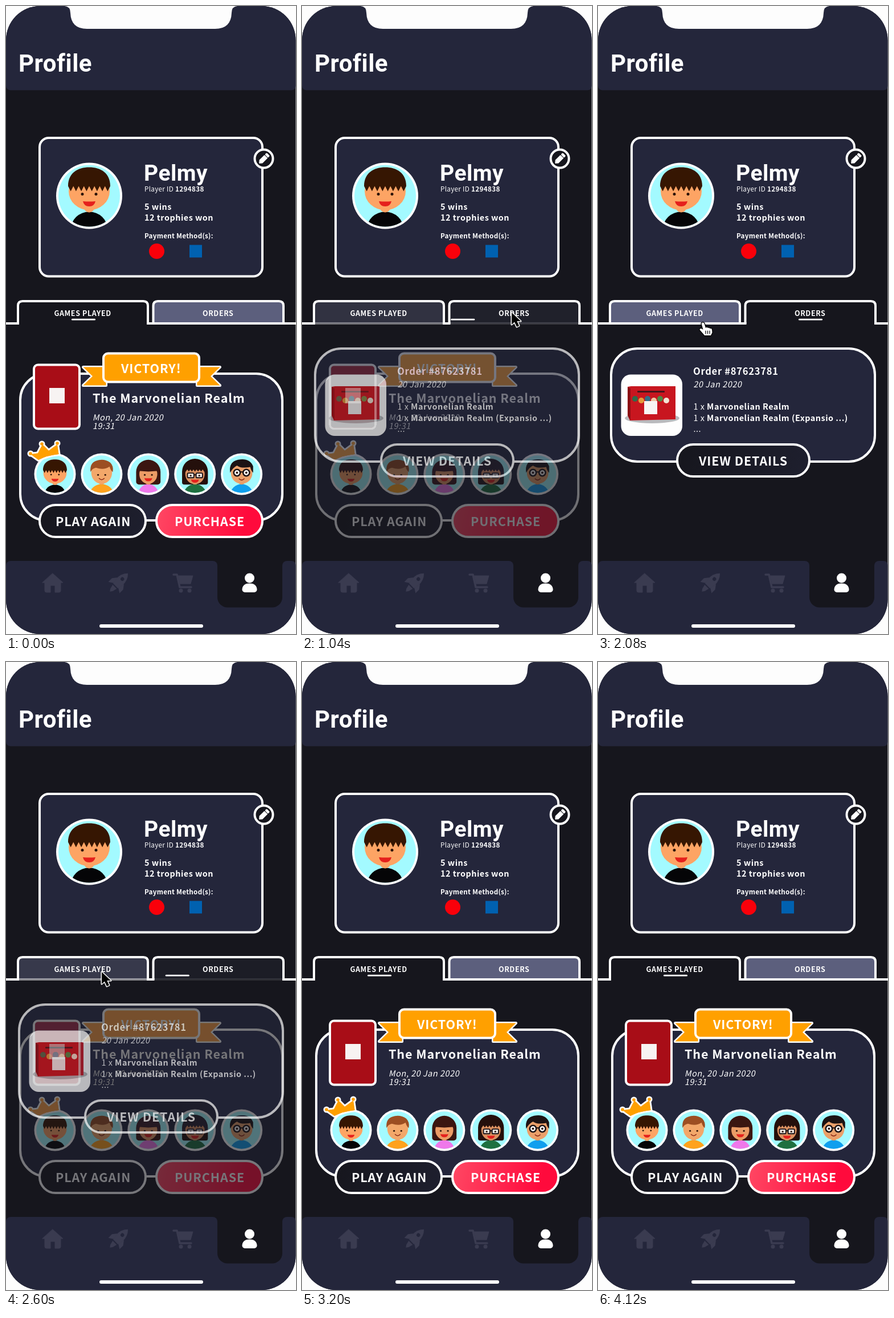
An HTML page with a canvas that plays this animation: 509x1100 px, repeating every 4160 ms.

```html
<!DOCTYPE html>
<html lang="en">
<head>
<meta charset="utf-8">
<title>Profile</title>
<style>
html, body { margin: 0; width: 100%; height: 100%; overflow: hidden; background: #fdfdfd; }
canvas { display: block; width: 509px; height: 1100px; }
</style>
</head>
<body>
<canvas id="stage"></canvas>
<script>
const W = 509, H = 1100, LOOP = 4160;
const NAVY = '#24263b', DARK = '#16161d', LILAC = '#5c5f7d', ICON = '#3a3b50';
const WHITE = '#fff', ORANGE = '#ffa000', SKY = '#a3faff';
const FONT = '"Noto Sans CJK SC", "Noto Sans CJK JP", "Noto Sans CJK", "Noto Sans", sans-serif';
const HEADING = 'Roboto, "Open Sans", sans-serif';
const ratio = window.devicePixelRatio || 1;

function layer(canvas) {
  canvas.width = W * ratio;
  canvas.height = H * ratio;
  const ctx = canvas.getContext('2d');
  ctx.scale(ratio, ratio);
  ctx.lineJoin = ctx.lineCap = 'round';
  return ctx;
}

const stage = layer(document.getElementById('stage'));
let c = stage;

// ---- helpers ----
function paint(fill, stroke, width = 4) {
  if (fill) { c.fillStyle = fill; c.fill(); }
  if (stroke) { c.strokeStyle = stroke; c.lineWidth = width; c.stroke(); }
}

function box(x, y, w, h, r, fill, stroke, width) {
  c.beginPath();
  c.roundRect(x, y, w, h, r);
  paint(fill, stroke, width);
}

function oval(x, y, rx, ry, fill, stroke, width) {
  c.beginPath();
  c.ellipse(x, y, rx, ry, 0, 0, 7);
  paint(fill, stroke, width);
}

const disc = (x, y, r, fill, stroke, width) => oval(x, y, r, r, fill, stroke, width);

function shape(d, fill, stroke, width) {
  const path = new Path2D(d);
  if (stroke) { c.strokeStyle = stroke; c.lineWidth = width; c.stroke(path); }
  if (fill) { c.fillStyle = fill; c.fill(path); }
}

function text(str, x, y, size, weight = 700, gap = 0, slant = 0, family = FONT) {
  c.save();
  c.translate(x, y);
  c.transform(1, 0, -slant, 1, 0, 0);
  c.font = `${weight} ${size}px ${family}`;
  c.letterSpacing = gap + 'px';
  c.fillStyle = WHITE;
  c.fillText(str, 0, 0);
  const width = c.measureText(str).width;
  c.restore();
  return width;
}

const heading = (str, x, y, size) => text(str, x, y, size, 600, 0.5, 0, HEADING);
const italic = (str, x, y) => text(str, x, y, 14.5, 400, 0.5, 0.2);

function at(x, y, angle, scale, draw) {
  c.save();
  c.translate(x, y);
  c.rotate(angle);
  c.scale(scale, scale);
  draw();
  c.restore();
}

function shade(x1, y1, x2, y2, from, to) {
  const g = c.createLinearGradient(x1, y1, x2, y2);
  g.addColorStop(0, from);
  g.addColorStop(1, to);
  return g;
}

// ---- avatars, drawn around 0,0 in a disc of radius 58 ----
function fringe(half, y, teeth, depth, top, color) {
  c.beginPath();
  c.moveTo(-half, y);
  c.bezierCurveTo(-half, top * 0.8, -half * 0.55, top, 0, top);
  c.bezierCurveTo(half * 0.55, top, half, top * 0.8, half, y);
  const step = half * 2 / teeth;
  for (let i = 0; i < teeth; i++) {
    const x = half - i * step;
    c.lineTo(x - step * 0.5, y + depth);
    c.lineTo(x - step, y);
  }
  paint(color);
}

function eyes(gap, y, r = 2.5) {
  disc(-gap, y, r, '#2b1208');
  disc(gap, y, r, '#2b1208');
}

const smile = (y, w = 7) => shape(`M${-w} ${y}Q0 ${y + 7} ${w} ${y}`, null, '#8d2a16', 2.5);
const grin = y => shape(`M-11 ${y}Q0 ${y + 1} 11 ${y}Q9 ${y + 9} 0 ${y + 9}Q-9 ${y + 9} -11 ${y}Z`, '#e5201c');

function bust(shirt, skin, half) {
  oval(0, 58, half, 30, shirt);
  box(-9, 12, 18, 17, 9, skin);
}

const people = {
  spiky() {
    bust('#050507', '#fda464', 32);
    oval(0, -8, 36, 33, '#fda464');
    fringe(37, -17, 8, 9, -50, '#361602');
    eyes(12, -3);
    grin(9.5);
  },
  swept() {
    bust('#ffa21c', '#eda063', 34);
    oval(0, -4, 29, 31, '#f2a76a');
    shape('M-31 -6Q-34 -30 -16 -37Q6 -45 24 -32Q34 -22 31 -6Q25 -10 22 -21Q6 -10 -16 -18Q-27 -16 -31 -6Z', '#9c4e22');
    eyes(10, 2);
    smile(12);
  },
  long() {
    box(-34, -40, 68, 69, [34, 34, 8, 8], '#3b1611');
    bust('#ef78ea', '#e3935c', 29);
    oval(0, 0, 25, 27, '#eb9c66');
    fringe(28, -9, 1, 2, -38, '#3b1611');
    eyes(10, 2);
    grin(11);
  },
  student() {
    box(-36, -43, 72, 72, [36, 36, 6, 6], '#24100c');
    bust('#1f7040', '#cc8150', 32);
    oval(0, 0, 27, 28, '#dc9261');
    fringe(30, -13, 7, 6, -41, '#24100c');
    for (const x of [-21, 3]) box(x, -3, 18, 13, 3, '#e9e2dc', '#181014', 3);
    shape('M-3 2H3', null, '#181014', 3);
    eyes(12, 4);
    grin(15);
  },
  clever() {
    bust('#109fee', '#e3955f', 32);
    oval(0, -3, 30, 30, '#eaa06a');
    shape('M-32 -4Q-37 -34 -10 -40Q22 -46 32 -22L32 -4Q26 -10 24 -20Q-2 -15 -13 -24Q-25 -18 -32 -4Z', '#1c1314');
    for (const x of [-13, 13]) disc(x, -4, 9, WHITE, '#1c1314', 4);
    shape('M-4 -5Q0 -8 4 -5', null, '#1c1314', 3);
    eyes(13, -4, 3);
    smile(13);
  }
};

const winner = () => at(0, 4, 0, 0.9, people.spiky);
const players = [winner, people.swept, people.long, people.student, people.clever];

function avatar(x, y, r, draw) {
  at(x, y, 0, r / 58, () => {
    disc(0, 0, 58, WHITE);
    disc(0, 0, r > 50 ? 54 : 52, SKY);
    c.clip();
    draw();
  });
}

// ---- fixed parts ----
function navIcons() {
  shape('M82 994L100 1010H96V1024Q96 1027 93 1027H86V1015H78V1027H71Q68 1027 68 1024V1010H64Z', ICON, ICON, 1);
  at(200, 1008, Math.PI / 4, 1, () => {
    shape('M0 -20Q9 -11 8 2L6 11H-6L-8 2Q-9 -11 0 -20Z', ICON);
    shape('M-8 -2L-14 6V15L-6 10ZM8 -2L14 6V15L6 10Z', ICON);
    shape('M-5 13H5L3 21L0 25L-3 21Z', ICON);
    disc(0, -6, 3.2, NAVY);
  });
  shape('M294 996H300L305 1018H325', null, ICON, 3.5);
  shape('M302 998H328L324 1012H305Z', ICON, ICON, 1);
  disc(307, 1024, 3.5, ICON);
  disc(322, 1024, 3.5, ICON);
  disc(427.5, 1002, 8.5, WHITE);
  box(414.5, 1011.5, 26, 15.5, [11, 11, 5, 5], WHITE);
}

function profileCard() {
  box(59, 231, 391, 242.5, 16, NAVY, WHITE);
  disc(452.5, 267.5, 16, DARK, WHITE);
  at(452.5, 267.5, -Math.PI / 4, 1, () => {
    shape('M-11 0L-7 -3.5H5V3.5H-7Z', WHITE, WHITE, 1);
    box(6.5, -4, 4.5, 8, 1.5, WHITE);
  });
  avatar(146, 332.5, 58, people.spiky);
  heading('Pelmy', 242, 306, 39);
  const w = text('Player ID ', 243, 325, 11.7, 500, 0.3);
  text('1294838', 243 + w, 325, 11.7, 700, 0.35);
  text('5 wins', 243, 357, 14.4, 700, 0.5);
  text('12 trophies won', 243, 376, 14.4, 700, 0.5);
  text('Payment Method(s):', 243, 406.5, 11.7, 700, 0.25);
  disc(264.5, 429.5, 13.5, '#f9000a');
  box(322, 418.5, 22, 22, 0, '#0061b0');
}

function drawBase() {
  c.fillStyle = '#fdfdfd';
  c.fillRect(0, 0, W, H);
  c.save();
  box(0, 0, 508.5, H, 60, DARK);
  c.clip();
  box(0, -20, W, 167.5, 8, NAVY);
  box(0, 972, 371, 140, [8, 8, 0, 0], NAVY);
  box(485, 972, 24, 140, [8, 8, 0, 0], NAVY);
  c.fillStyle = NAVY;
  c.fillRect(360, 1030, 140, 70);
  box(371, 1000, 114, 53.5, [0, 0, 18, 18], DARK);
  c.restore();
  shape('M103 0Q113 1 113 12Q114 40 142 40H367Q395 40 396 12Q396 1 406 0Z', '#fdfdfd');
  heading('Profile', 22, 115, 42);
  profileCard();
  navIcons();
  box(164, 1083, 182, 6, 3, WHITE);
}

// ---- the two pages ----
function button(label, x, y, w, tx, fill) {
  box(x, y, w, 56, 28, fill, WHITE);
  text(label, tx, y + 37, 21.5, 700, 0.9);
}

const darkFill = (x, y, w) => shade(x, y, x + w, y + 40, DARK, '#1e1f2e');

function crown() {
  const d = 'M43 785L56 783.5L64 768L75 779L90 768L92.5 785Q72 787 57 795Z';
  const tips = [[43, 784], [63, 767], [90, 766]];
  shape(d, ORANGE, WHITE, 6);
  for (const [x, y] of tips) disc(x, y, 5.5, WHITE);
  shape(d, ORANGE);
  for (const [x, y] of tips) disc(x, y, 2.8, ORANGE);
}

function drawGames() {
  box(25, 644, 460, 257, 46, NAVY, WHITE);
  for (const flip of [1, -1]) {
    c.save();
    c.translate(255.5, 0);
    c.scale(flip, 1);
    shape('M-120 632.5H-80V664.5H-120L-103.5 648.5Z', ORANGE, WHITE, 5);
    c.restore();
  }
  box(171, 608.5, 168, 50, 8, ORANGE, WHITE);
  text('VICTORY!', 202, 643, 21.5, 700, 0.9);
  box(49, 628.5, 80, 112, 7, '#a80d17', WHITE);
  box(76, 669, 27, 27, 0, '#f7f3f2');
  text('The Marvonelian Realm', 152, 695, 21.5, 700, 0.9);
  italic('Mon, 20 Jan 2020', 152, 725.5);
  italic('19:31', 152, 741);
  players.forEach((draw, i) => avatar(86 + i * 81.9, 820, 36.5, draw));
  crown();
  button('PLAY AGAIN', 59, 874, 186, 87, darkFill(59, 874, 186));
  button('PURCHASE', 264, 874, 186, 296, shade(264, 874, 420, 910, '#ff4864', '#ff0a3c'));
}

function productPhoto() {
  box(40.5, 645.5, 107.5, 107.5, 17, '#fefefe');
  oval(95, 722, 48, 9, '#b9babd');
  shape('M52 667L58 666H136V724L56 726L52 717Z', '#c8161f');
  shape('M52 667L57 670V726L52 717Z', '#8c0d14');
  box(69, 674, 48, 3, 1, '#42161b');
  ['#2f6a4a', '#e59b3a', '#336f86', '#efc6a2', '#4d8b47', '#f3e4d4'].forEach((col, i) =>
    disc(65 + i * 11, 688 + i % 2 * 3, 5, col));
  box(81, 692, 23, 23, 0, '#f8f5f3');
}

function drawOrders() {
  box(23, 600, 463, 198, 46, NAVY, WHITE);
  productPhoto();
  text('Order #87623781', 167, 646, 16.6, 700, 0.7);
  italic('20 Jan 2020', 167.5, 668);
  ['Marvonelian Realm', 'Marvonelian Realm (Expansio ...)'].forEach((name, i) => {
    const y = 707 + i * 19.5;
    const w = text('1 x ', 167.5, y, 14.4, 400, 0.5);
    text(name, 167.5 + w, y, 14.4, 700, 0.5);
  });
  text('...', 167.5, 746, 14.4, 400, 0.5);
  button('VIEW DETAILS', 139, 768, 232, 177, darkFill(139, 768, 232));
}

function record(draw) {
  const canvas = document.createElement('canvas');
  c = layer(canvas);
  draw();
  c = stage;
  return canvas;
}

const base = record(drawBase);
const games = record(drawGames);
const orders = record(drawOrders);

function put(image, alpha, mode = 'source-over') {
  if (alpha <= 0) return;
  c.save();
  c.globalAlpha = alpha;
  c.globalCompositeOperation = mode;
  c.drawImage(image, 0, 0, W, H);
  c.restore();
}

// ---- tabs ----
function tab(x1, x2, label, tx, idle) {
  const d = `M${x1} 556V525Q${x1} 517 ${x1 + 8} 517H${x2 - 8}Q${x2} 517 ${x2} 525V556`;
  shape(d, DARK);
  c.globalAlpha = idle;
  shape(d, LILAC);
  c.fillStyle = WHITE;
  c.fillRect(x1, 554, x2 - x1, 4);
  c.globalAlpha = 1;
  c.lineCap = 'butt';
  shape(d, null, WHITE, 4);
  c.lineCap = 'round';
  text(label, tx, 542.5, 12.5, 700, 0.6);
}

function tabs(gamesIdle, ordersIdle, lineX) {
  tab(21, 249, 'GAMES PLAYED', 84.5, gamesIdle);
  tab(258.5, 487, 'ORDERS', 345, ordersIdle);
  c.fillStyle = WHITE;
  for (const [a, b] of [[0, 23], [247, 260.5], [485, W]]) c.fillRect(a, 554, b - a, 4);
  box(lineX, 547.8, 42, 2.8, 1.4, WHITE);
}

// ---- pointer ----
const clamp = x => Math.min(1, Math.max(0, x));
const ramp = (t, a, b) => { const x = clamp((t - a) / (b - a)); return x * x * (3 - 2 * x); };
const mix = (a, b, k) => a + (b - a) * k;

const route = [
  [560, 515, 640], [760, 368, 537], [1100, 368, 537], [1200, 369, 534], [1400, 369, 534],
  [1980, 184, 555], [2240, 184, 555], [2440, 168, 543], [2620, 168, 543], [2790, -28, 580]
];
const SWITCH = [850, 2480], SPAN = 330;

function pointer(t) {
  const i = route.findIndex(k => k[0] > t);
  if (i < 1) return;
  const [t0, x0, y0] = route[i - 1], [t1, x1, y1] = route[i];
  const k = ramp(t, t0, t1), x = mix(x0, x1, k), y = mix(y0, y1, k);
  const overOrders = t < SWITCH[0] && x > 257 && x < 489 && y < 558;
  const overGames = t > 1200 && t < SWITCH[1] && x < 250;
  at(x, y, 0, 1, overOrders || overGames ? hand : arrow);
}

function arrow() {
  shape('M0 0V21L5 16.5L9 25L13 23.2L9.3 15H16Z', '#000', WHITE, 3);
}

function hand() {
  shape('M-2.5 1Q0 -2.5 2.5 1L5 9Q7 6.5 9 9Q11 7.5 12.5 10Q15.5 9 16 12L16.5 17L14 22H3L-3 15Q-6.5 12 -5 10.5Q-3 9 0.5 12Z', WHITE, '#000', 2.6);
  shape('M5 14V19M8.5 14V19M12 14V19', null, '#000', 1.2);
}

function frame(now) {
  const t = now % LOOP;
  const back = t >= 1800;
  const start = SWITCH[back ? 1 : 0];
  const p = ramp(t, start, start + SPAN);
  const fade = Math.pow(p, 0.75);
  const [from, to] = back ? [orders, games] : [games, orders];
  const leaving = p * p, arriving = (1 - p) ** 2;

  c.drawImage(base, 0, 0, W, H);
  if (back) tabs(arriving, leaving, mix(352, 115, p));
  else tabs(leaving, arriving, mix(115, 352, p));
  put(to, fade);
  put(from, 1 - p, p > 0 ? 'lighten' : 'source-over');
  pointer(t);
  requestAnimationFrame(frame);
}
frame(0);
</script>
</body>
</html>
```
